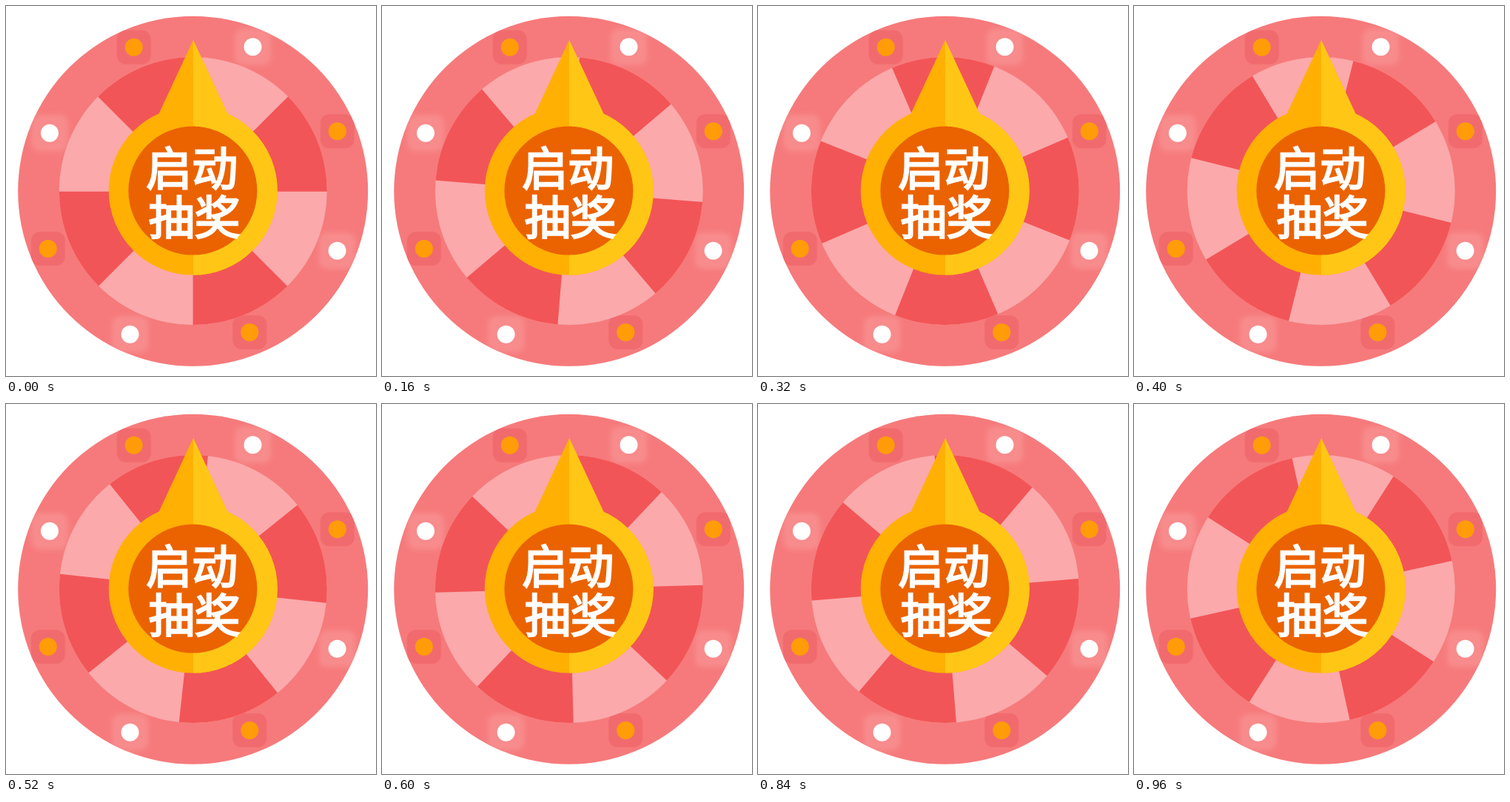
An HTML page for the animation above (1 s loop, 500 by 500 pixels).

```html
<!DOCTYPE html>
<html lang="zh-CN">
<head>
<meta charset="utf-8">
<title>启动抽奖</title>
<style>
  html, body { margin: 0; width: 100%; height: 100%; overflow: hidden; background: #fff; }
  svg { display: block; width: 100%; height: 100%; }
  text {
    font: 400 62px "Noto Sans CJK SC", "Noto Sans CJK", "Noto Sans CJK JP", sans-serif;
    fill: #fff;
    stroke: #fff;
    stroke-width: 2.4px;
    text-anchor: middle;
  }
</style>
</head>
<body>
<svg viewBox="0 0 500 500">
  <defs>
    <filter id="soft" x="-30%" y="-30%" width="160%" height="160%">
      <feGaussianBlur stdDeviation="3"/>
    </filter>
    <clipPath id="rightHalf"><rect x="253" y="0" width="247" height="500"/></clipPath>
    <clipPath id="plate"><circle cx="252.7" cy="250.3" r="236.5"/></clipPath>
    <clipPath id="disc"><circle cx="252.8" cy="250" r="181"/></clipPath>
    <g id="pointer">
      <circle cx="252.8" cy="249.6" r="114"/>
      <path d="M253 46L301 149H205Z"/>
    </g>
  </defs>
  <circle cx="252.7" cy="250.3" r="236.5" fill="#f67a7b"/>
  <g id="lights" clip-path="url(#plate)"></g>
  <circle cx="252.8" cy="250" r="181" fill="#fba9ab"/>
  <g clip-path="url(#disc)"><path id="wedges" fill="#f25557"/></g>
  <use href="#pointer" fill="#ffb003"/>
  <use href="#pointer" fill="#ffc616" clip-path="url(#rightHalf)"/>
  <circle cx="252.4" cy="249.6" r="87" fill="#eb6200"/>
  <text x="251.3" y="243">启动</text>
  <text x="254.8" y="308.8">抽奖</text>
</svg>
<script>
const CX = 253, CY = 250;
const LOOP = 1000, FRAME = 40;
const STEP = 360 / 29;

const wedges = document.getElementById('wedges');
const lights = document.getElementById('lights');

function add(tag, attrs) {
  const el = document.createElementNS('http://www.w3.org/2000/svg', tag);
  for (const key in attrs) el.setAttribute(key, attrs[key]);
  lights.appendChild(el);
}

function addLight(cx, cy, fill, halo, half, extra) {
  add('rect', { x: cx - half, y: cy - half, width: 2 * half, height: 2 * half, rx: 12, fill: halo, ...extra });
  add('circle', { cx, cy, r: 12, fill });
}

for (const [x, y] of [[333.5, 55.3], [59, 171.8], [447.6, 330.8], [167.6, 443.8]])
  addLight(x, y, '#fff', '#f88b8c', 25, { filter: 'url(#soft)' });
for (const [x, y] of [[172.8, 55.8], [447.8, 169.3], [56.8, 328], [329.3, 441]])
  addLight(x, y, '#ff9c08', '#f16b6e', 23);

// the wedges meet slightly off the axis they turn around
const HUB_X = CX - 0.4, HUB_Y = CY + 0.8, REACH = 190;

function rim(deg) {
  const a = deg * Math.PI / 180;
  return `${HUB_X + REACH * Math.cos(a)} ${HUB_Y + REACH * Math.sin(a)}`;
}

let path = '';
for (let a = 45; a < 360; a += 90)
  path += `M${HUB_X} ${HUB_Y}L${rim(a)}A${REACH} ${REACH} 0 0 1 ${rim(a + 45)}Z`;
wedges.setAttribute('d', path);

// 30 fps rotation sampled at 25 fps: every fifth step is doubled
function draw(time) {
  const frame = Math.floor((time % LOOP) / FRAME);
  const angle = Math.floor(frame * 6 / 5) * STEP;
  wedges.setAttribute('transform', `rotate(${angle} ${CX} ${CY})`);
}

function tick(now) {
  draw(now);
  requestAnimationFrame(tick);
}

draw(0);
requestAnimationFrame(tick);
</script>
</body>
</html>
```
